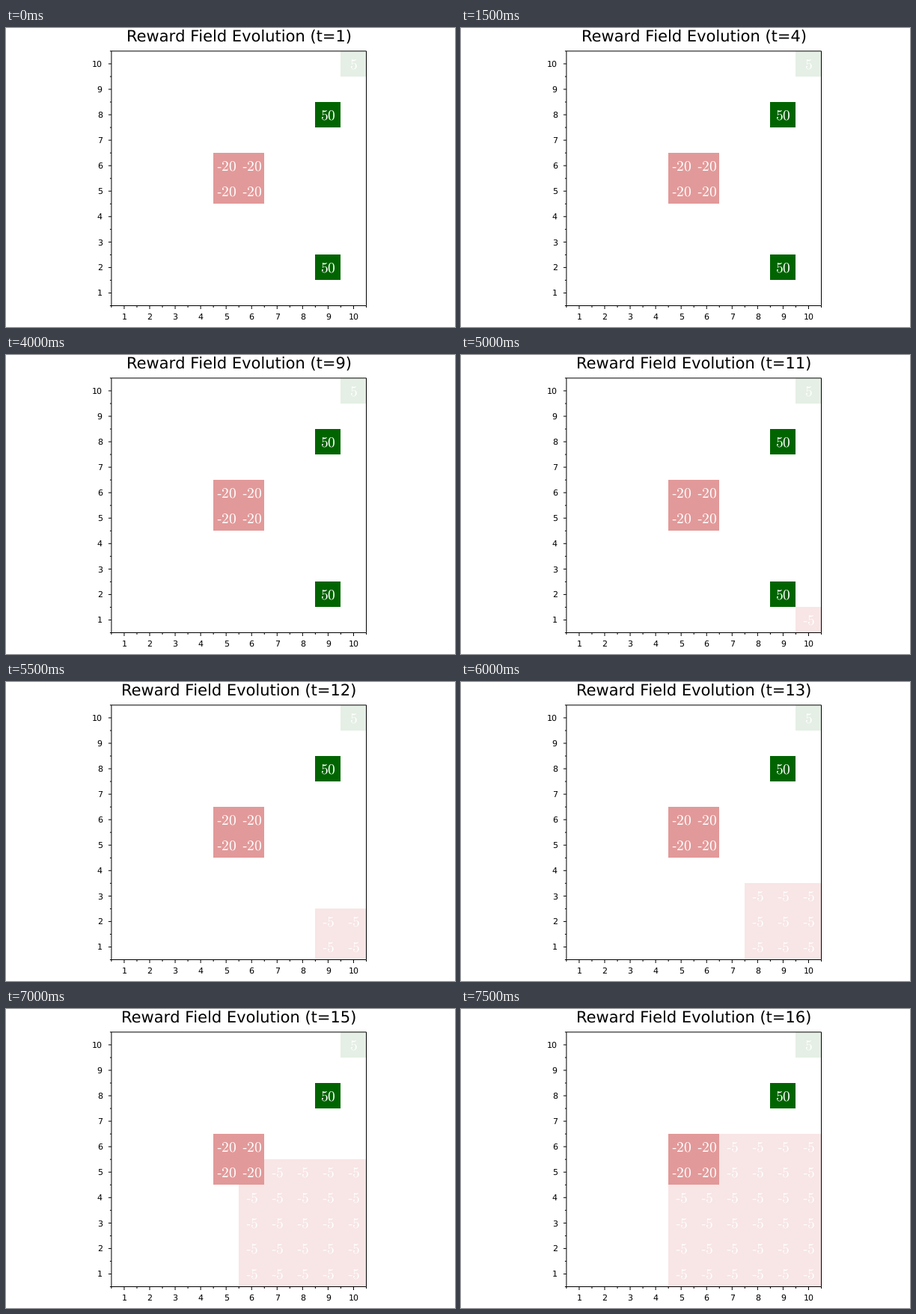
Write a matplotlib script that moves like this. It is 600x400 px and loops after 8 s.

```python
import matplotlib.pyplot as plt
from matplotlib.animation import FuncAnimation
from matplotlib.patches import Rectangle

plt.rcParams["text.hinting"] = "none"
plt.rcParams["text.hinting_factor"] = 1

W, H, DPI = 600, 400, 100
LEFT, BOTTOM, CELL, N = 140.9, 371.5, 34.06, 10
FRAMES, STEP_MS = 16, 500
SPREAD_START = 10
COLORS = {50: "#006400", 5: "#e5efe5", -20: "#e29999", -5: "#f8e5e5"}

fig = plt.figure(figsize=(W / DPI, H / DPI), dpi=DPI, facecolor="white")
ax = fig.add_axes([0, 0, 1, 1])
ax.set_xlim(0, W)
ax.set_ylim(H, 0)
ax.axis("off")


def px(col):
    return LEFT + (col - 0.5) * CELL


def py(row):
    return BOTTOM - (row - 0.5) * CELL


def line(x0, y0, x1, y1):
    ax.plot([x0, x1], [y0, y1], color="black", lw=0.72, zorder=3,
            solid_capstyle="butt", snap=False)


def label(x, y, s, size, ha="center"):
    return ax.text(x, y, s, fontsize=size, family="DejaVu Sans",
                   ha=ha, va="baseline", zorder=4)


def draw_axes():
    right, top = LEFT + N * CELL, BOTTOM - N * CELL
    line(LEFT, BOTTOM, right, BOTTOM)
    line(LEFT, top, LEFT, BOTTOM)
    line(LEFT, top, right, top)
    line(right, top, right, BOTTOM)
    for k in range(1, N + 1):
        line(px(k), BOTTOM, px(k), BOTTOM + 4.5)
        line(LEFT - 4, py(k), LEFT, py(k))
        label(px(k), 390, str(k), 8)
        label(128.8, py(k) + 4, str(k), 8, "right")
    for k in range(N + 1):
        line(px(k + 0.5), BOTTOM, px(k + 0.5), BOTTOM + 2.5)
        line(LEFT - 2, py(k + 0.5), LEFT, py(k + 0.5))


def rewards(step):
    """Reward of every non-empty cell; the penalty spreads from the corner."""
    field = {(9, 2): 50, (9, 8): 50, (10, 10): 5}
    reach = max(0, step - SPREAD_START + 1)
    for col in range(N - reach + 1, N + 1):
        for row in range(1, reach + 1):
            field[col, row] = -5
    field.update({(c, r): -20 for c in (5, 6) for r in (5, 6)})
    return field


def make_cell(col, row):
    box = Rectangle((px(col - 0.5), py(row + 0.5)), CELL, CELL, lw=0,
                    zorder=1)
    ax.add_patch(box)
    num = ax.text(px(col), py(row) + 7.5, "", color="white", fontsize=14,
                  math_fontfamily="cm", ha="center", va="baseline", zorder=2)
    return box, num


draw_axes()
title = label(LEFT + N * CELL / 2 + 0.4, 18, "", 15)
cells = {(c, r): make_cell(c, r)
         for c in range(1, N + 1) for r in range(1, N + 1)}


def update(step):
    title.set_text(f"Reward Field Evolution (t={step + 1})")
    field = rewards(step)
    for pos, (box, num) in cells.items():
        value = field.get(pos)
        box.set_visible(value is not None)
        num.set_visible(value is not None)
        if value is not None:
            box.set_facecolor(COLORS[value])
            sign = "\u2010" if value < 0 else ""
            num.set_text(f"${sign}{abs(value)}$")
    return []


anim = FuncAnimation(fig, update, frames=FRAMES, interval=STEP_MS,
                     repeat=True, repeat_delay=0, blit=False)
plt.show()
```
